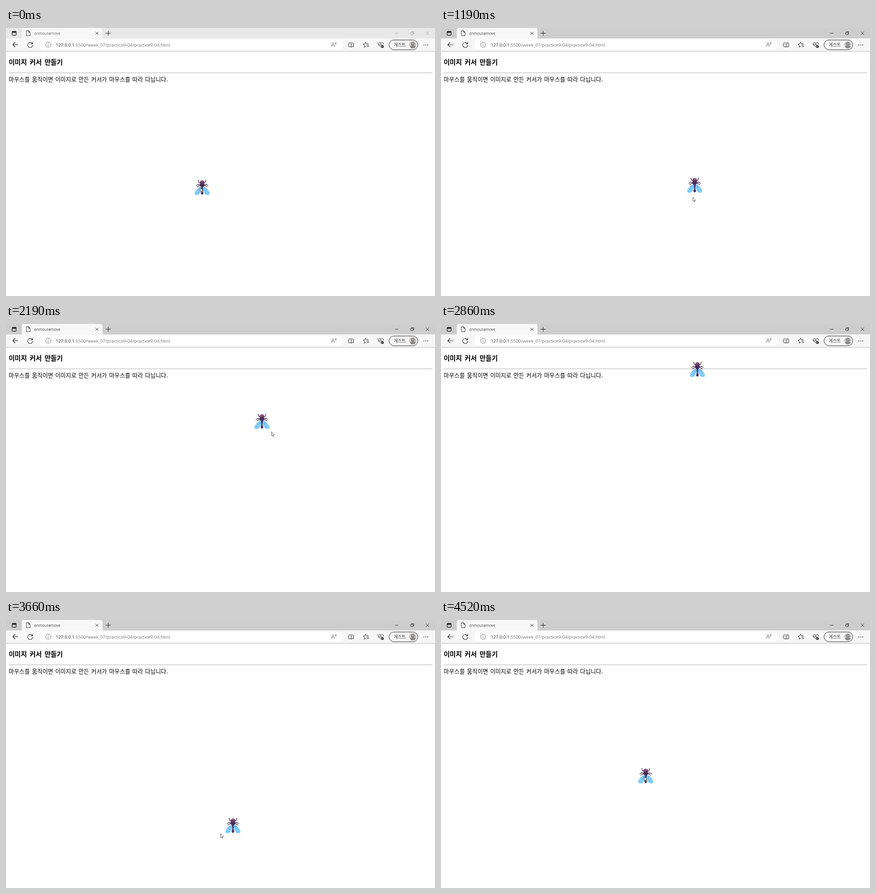
An HTML page that plays this animation: 947x592 px, repeating every 5.73 s.

```html
<!DOCTYPE html>
<html lang="ko">
<head>
<meta charset="utf-8">
<title>onmousemove</title>
<style>
  html, body { margin: 0; width: 100%; height: 100%; overflow: hidden; background: #fff; }
  svg { display: block; }
  text { font-family: "Open Sans", "Noto Sans CJK KR", "Noto Sans CJK", sans-serif; }
  .ko { font-family: "Noto Sans CJK KR", "Noto Sans CJK", sans-serif; }
  .strip { fill: #cdcdcd; }
  .title { fill: #444; }
  .win { stroke: #222; }
  .idle .strip { fill: #e8e8e8; }
  .idle .title { fill: #666; }
  .idle .win { stroke: #a0a0a0; }
  .line { fill: none; stroke: #222; stroke-linecap: round; stroke-linejoin: round; }
  .soft { stroke: #666; stroke-width: .9; }
</style>
</head>
<body>
<svg id="stage" class="idle" width="947" height="592" viewBox="0 0 947 592">
  <defs>
    <radialGradient id="head" cx=".5" cy=".25">
      <stop offset="0" stop-color="#a4628a"/><stop offset="1" stop-color="#563260"/>
    </radialGradient>
    <linearGradient id="wing" x2="0" y2="1">
      <stop offset="0" stop-color="#6db4ec"/><stop offset=".5" stop-color="#8ed4fd"/><stop offset="1" stop-color="#80cbfc"/>
    </linearGradient>
    <g id="side">
      <path d="M-1-2C-7-1-15 5-16.500 12C-17.500 18-10 18-7 15.500C-3.500 12-1 7 0 2Z" fill="url(#wing)"/>
      <path d="M-3 3Q-8 7-9 15M-5 4Q-11 7-14 13" fill="none" stroke="#5ba9e4" stroke-width=".7"/>
      <path d="M-4-9L-7-11L-8.500-16M-4-6L-9-6.500L-13-4M-4-4L-8-3L-11-1" fill="none"
        stroke="#49304f" stroke-width="1.400" stroke-linecap="round" stroke-linejoin="round"/>
    </g>
  </defs>

  <!-- tab strip -->
  <rect class="strip" width="947" height="23"/>
  <path d="M35 23V4Q35 0 39 0H209Q213 0 213 4V23Z" fill="#f7f7f7"/>
  <rect class="line" x="13.500" y="7.500" width="9" height="8.500" rx="1.800" stroke-width="1.300"/>
  <path d="M13 8H23V10.500H13Z" fill="#222"/>
  <path class="line" d="M46 6H50L53 9.500V17H45V6.500ZM50 6V9.500H53" stroke-width=".9"/>
  <text class="title" x="62" y="14.500" font-size="8.300">onmousemove</text>
  <path class="line" d="M198 9L203.500 14.500M203.500 9L198 14.500"/>
  <path class="line" d="M220.500 11.500H230.500M225.500 6.500V16.500"/>
  <path class="win" d="M858.500 11.500H866M893.500 9.500H898.500V14.500H893.500ZM895 9V8H900V13H898.500M927 8L934 15M934 8L927 15" fill="none" stroke-width=".9"/>

  <!-- toolbar -->
  <rect y="23" width="947" height="28" fill="#f7f7f7"/>
  <path d="M0 51.500H947" stroke="#b8b8b8"/>
  <rect x="74" y="26" width="669" height="22.500" rx="11.250" fill="#fff"/>
  <path class="line" d="M15 37H26.500M20 32L15 37L20 42" stroke-width="1.100"/>
  <path class="line" d="M58.500 35A5.600 5.600 0 1 0 59 38M58.800 31.500V35H55" stroke-width="1.100"/>
  <circle class="line soft" cx="93" cy="37" r="5.700"/>
  <path class="line soft" d="M93 36.500V40M93 34V34.200M718 41L721.500 32L725 41M719.300 38H723.800M726 32Q727.500 33.500 726.500 36M728 31Q730 33.500 728.500 36.500"/>
  <text x="110" y="41" font-size="9.810" fill="#222">127.0.0.1<tspan fill="#707070">:5500/week_07/practice9-04/practice9-04.html</tspan></text>
  <g class="line">
    <path d="M760.500 33H757.500Q756.500 33 756.500 34V40.500Q756.500 41.500 757.500 41.500H760.500M763.500 33H766.500Q767.500 33 767.500 34V40.500Q767.500 41.500 766.500 41.500H763.500M762 32V43"/>
    <path d="M794 41L790.500 42.500L791 38.500L788.500 35.500L792 35L794 31.500L796 35H800M796 38H801M797 41H801"/>
    <path d="M827 42L822 37Q820 34 823 32.500Q826 31.500 827.500 34Q829 31.500 832 32.500Q834 34 833 36M823 37H825L827 35L828.500 38H830"/>
    <circle cx="831" cy="41" r="3" fill="#222" stroke="none"/>
    <path d="M829.600 41L830.600 42L832.300 40" style="stroke:#fff"/>
    <rect x="845.500" y="26.500" width="63.500" height="21.500" rx="10.750"/>
  </g>
  <text class="ko" x="856" y="40.500" font-size="9.700" fill="#333">게스트</text>
  <circle cx="898" cy="37" r="8" fill="#c8c6c4"/>
  <path d="M892 42Q892 38.500 898 38.500T904 42Q902 45 898 45T892 42Z" fill="#8a8886"/>
  <circle cx="898" cy="35" r="4" fill="#8a8886"/>
  <text x="896.500" y="38" font-size="7" fill="#fff">?</text>
  <path class="line" d="M922.500 37.500h.01M926.800 37.500h.01M931 37.500h.01" stroke-width="2"/>

  <!-- page -->
  <text class="ko" x="6" y="81" font-size="14.500" font-weight="700" word-spacing="2.200">이미지 커서 만들기</text>
  <path d="M6 99H941" stroke="#aaa"/>
  <text class="ko" x="6" y="118" font-size="12.700" word-spacing="1.100">마우스를 움직이면 이미지로 만든 커서가 마우스를 따라 다닙니다.</text>

  <g id="fly">
    <use href="#side"/>
    <use href="#side" transform="scale(-1 1)"/>
    <path d="M-2-2H2L1.200 7Q1.500 10 2.800 12Q3 16 0 16T-2.800 12Q-1.500 10-1.200 7Z" fill="#46305f"/>
    <ellipse cy="-5.500" rx="5" ry="5" fill="#452c57"/>
    <ellipse cy="-11" rx="5" ry="4.500" fill="url(#head)"/>
  </g>
  <path id="cursor" d="M0 0V9L2 7.300L3.500 10.500L4.800 9.900L3.400 6.800H6Z" fill="#fff" stroke="#333" stroke-width=".8"/>
</svg>

<script>
const LOOP = 5730, START = 651, STEP = 66.6, OFF_PAGE = 33;
const CX = 430, CY = 300, TURN = 2 * Math.PI, DEG = TURN / 360;

// The fly circles clockwise around (CX, CY) through these points: step, x, y
const orbit = [
  [-1, 433, 352], [5, 487, 215], [7, 597, 278], [8, 560, 347], [12, 303, 335],
  [17, 403, 427], [23, 565, 215], [26, 470, 434], [33, 566, 100], [35, 530, 278],
  [37, 350, 318], [40, 228, 185], [45, 501, 454], [48, 310, 385], [51, 550, 330],
  [53, 452, 344]
].map(([step, x, y]) => ({ step, angle: Math.atan2(y - CY, x - CX), radius: Math.hypot(x - CX, y - CY) }));

// unwind the angles so that they only grow
orbit.forEach((p, k) => {
  while (k && p.angle < orbit[k - 1].angle) p.angle += TURN;
});

const first = orbit[0].step, last = orbit[orbit.length - 1].step;

function orbitAt(step) {
  const k = Math.max(1, orbit.findIndex(p => p.step >= step));
  const a = orbit[k - 1], b = orbit[k], u = (step - a.step) / (b.step - a.step);
  const mix = name => a[name] + (b[name] - a[name]) * u;
  return [mix("angle"), mix("radius")];
}

const stage = document.getElementById("stage");
const fly = document.getElementById("fly");
const cursor = document.getElementById("cursor");

function place(el, angle, radius) {
  const x = Math.round(CX + radius * Math.cos(angle));
  const y = Math.round(CY + radius * Math.sin(angle));
  el.setAttribute("transform", `translate(${x} ${y})`);
}

function draw(now) {
  const t = now % LOOP;
  const step = Math.max(first, Math.min(last, Math.floor((t - START) / STEP)));
  const moving = step > first && step < last;
  const [angle, radius] = orbitAt(step);
  stage.classList.toggle("idle", t < 70);
  place(fly, angle, radius);
  // the pointer runs ahead of the fly
  place(cursor, angle + (moving ? 10.5 : 4) * DEG, radius + (moving ? 8 : 1));
  cursor.style.display = step === OFF_PAGE ? "none" : "";
}

const begin = performance.now();
(function tick() {
  draw(performance.now() - begin);
  requestAnimationFrame(tick);
})();
</script>
</body>
</html>
```
